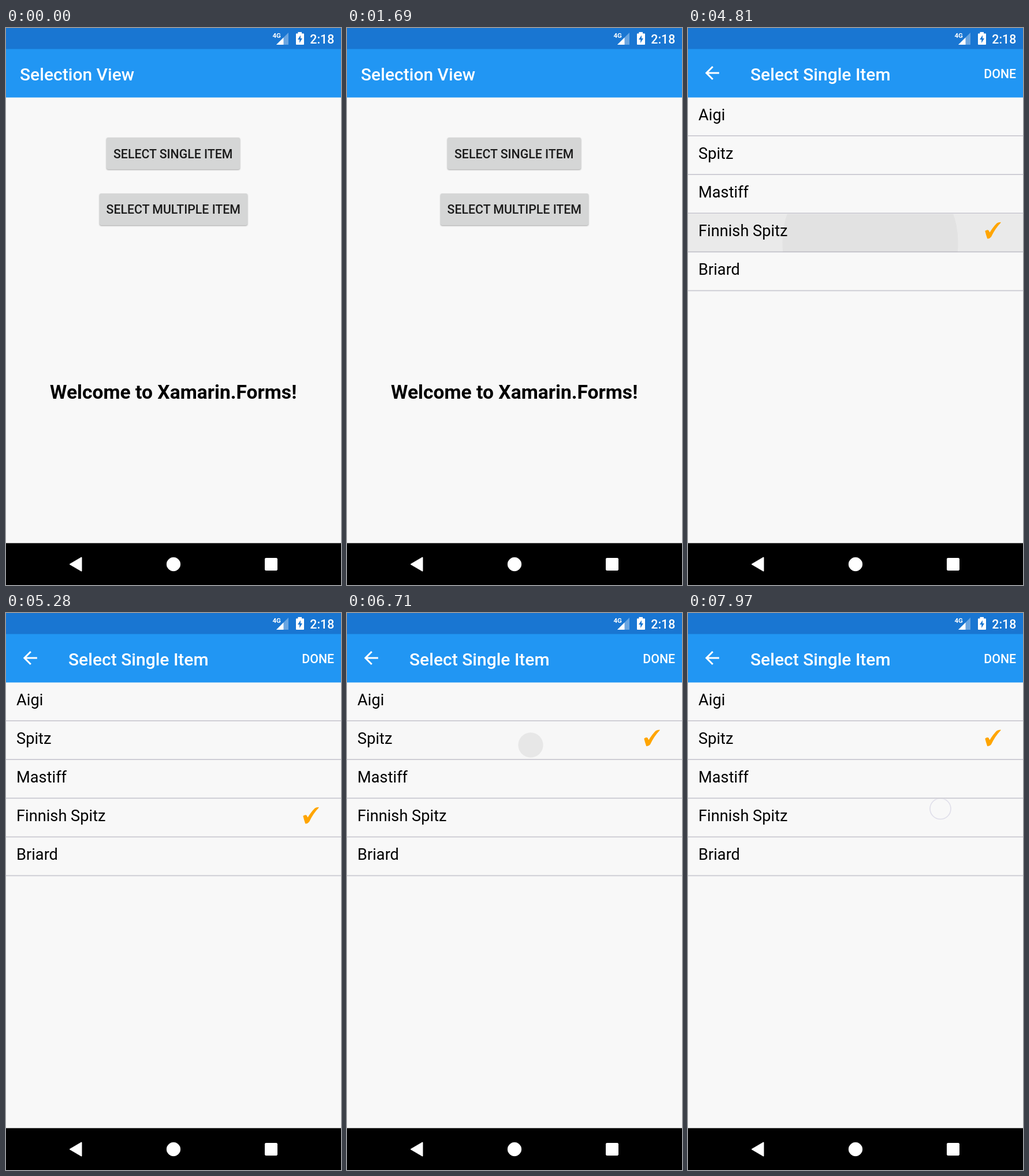
An HTML page for the animation above (8 s loop, 580 px wide and 966 px high).

```html
<!DOCTYPE html>
<html lang="en">
<head>
<meta charset="utf-8">
<title>Selection View</title>
<style>
  html, body { margin: 0; width: 100%; height: 100%; overflow: hidden; background: #f8f8f8; }
  svg { display: block; width: 580px; height: 966px; font-family: Roboto, sans-serif; }
  .title { font-size: 30px; font-weight: 500; fill: #fff; }
  .label { font-size: 21.3px; font-weight: 500; }
  .item { font-size: 27.2px; }
  .welcome { font-size: 33.6px; font-weight: 700; }
  .button { fill: #d5d6d6; filter: drop-shadow(0 1.2px 1.3px rgba(0, 0, 0, .35)); }
</style>
</head>
<body>
<svg viewBox="0 0 580 966">
  <defs>
    <clipPath id="contentClip"><rect y="120" width="580" height="774"/></clipPath>
    <clipPath id="buttonClip"><rect x="174" y="190" width="231" height="55" rx="3"/></clipPath>
    <clipPath id="rowClip"><rect id="rowClipRect" width="580" height="66"/></clipPath>
  </defs>
  <rect width="580" height="966" fill="#f8f8f8"/>

  <g clip-path="url(#contentClip)">
    <g id="home" text-anchor="middle">
      <rect class="button" x="174" y="190" width="231" height="55" rx="3"/>
      <circle id="buttonRipple" cx="290" cy="218" clip-path="url(#buttonClip)"/>
      <text class="label" x="289.2" y="225.6" fill="#1b1b1b">SELECT SINGLE ITEM</text>
      <rect class="button" x="162" y="287" width="256" height="55" rx="3"/>
      <text class="label" x="289.8" y="322.3" fill="#1b1b1b">SELECT MULTIPLE ITEM</text>
      <text class="welcome" x="289.7" y="642.5">Welcome to Xamarin.Forms!</text>
    </g>
    <g id="list">
      <g id="rows"></g>
      <g clip-path="url(#rowClip)">
        <rect id="rowTint" y="121" width="580" height="345"/>
        <circle id="rowRipple" stroke="#d9d7e6" stroke-width="1.6"/>
      </g>
      <g id="labels"></g>
      <path id="check" fill="#ffa500" stroke="#ffa500" stroke-width="1.2" stroke-linejoin="round" d="M515 218Q518 215.5 520 217L522.3 221.5Q529 210.5 535 204.8Q537.5 203 541 203Q531 213.5 524.5 227.5Q522 230.5 518.7 230.5Q516.5 224 515 218Z"/>
    </g>
  </g>

  <rect width="580" height="37" fill="#1976d2"/>
  <rect y="36.5" width="580" height="84" fill="#2196f3"/>
  <g fill="#fff">
    <text x="461.5" y="17" font-size="11.5" font-weight="700">4G</text>
    <path d="M489 8V29H468Z" opacity=".35"/>
    <path d="M480.5 16.5V29H468Z"/>
    <path d="M505.5 7H512V9.5H515Q516 9.5 516 10.5V28Q516 29 515 29H503Q502 29 502 28V10.5Q502 9.5 503 9.5H505.5Z"/>
    <path d="M510 12.5L505 20H508.2V26L513 18H510Z" fill="#1976d2"/>
    <text class="label" x="526.3" y="26.6">2:18</text>
  </g>
  <text id="homeTitle" class="title" x="24" y="90.5">Selection View</text>
  <g id="listBar" fill="#fff">
    <path transform="translate(23.7 59.9) scale(1.51)" d="M20 11H7.83l5.59-5.59L12 4l-8 8 8 8 1.41-1.41L7.83 13H20z"/>
    <text class="title" x="108" y="90.5">Select Single Item</text>
    <text class="label" x="512.3" y="86.8">DONE</text>
  </g>

  <rect y="893.4" width="580" height="73" fill="#000"/>
  <g fill="#fff" stroke="#fff" stroke-linejoin="round">
    <path d="M111 930L130.5 918.5V941.5Z" stroke-width="2"/>
    <circle cx="290" cy="930" r="11.7"/>
    <rect x="448.5" y="919.5" width="21" height="21" rx="1.5"/>
  </g>
</svg>
<script>
const LOOP = 8000, ROW = 67.15, TOP = 121;
const PUSH_START = 3080, PUSH_TIME = 220;
const RIPPLE_SPEED = 0.46, PRESS_RADIUS = 18, PRESS_TIME = 170;

const taps = [
  { press: 4480, release: 4480, end: 5280, row: 3, x: 315.5, y: 372 },
  { press: 5570, release: 5570, end: 6330, row: 2, x: 315, y: 303 },
  { press: 6420, release: 6703, end: 7300, row: 1, x: 318, y: 229 },
  { press: 7800, release: 8100, end: 8900, row: 3, x: 437, y: 339.5 }
];

const $ = id => document.getElementById(id);
const clamp = v => Math.max(0, Math.min(1, v));
const set = (id, attributes) => {
  for (const name in attributes) $(id).setAttribute(name, attributes[name]);
};

['Aigi', 'Spitz', 'Mastiff', 'Finnish Spitz', 'Briard'].forEach((name, i) => {
  const y = i * ROW;
  $('rows').innerHTML += `<rect y="${186 + y}" width="580" height="1.8" fill="#cbcad2"/>`;
  $('labels').innerHTML += `<text class="item" x="18.1" y="${159.6 + y}">${name}</text>`;
});

function scaleAboutCentre(s) {
  return `translate(290 507) scale(${s}) translate(-290 -507)`;
}

function drawPush(t) {
  const p = clamp((t - PUSH_START) / PUSH_TIME);
  const fade = 1 - (1 - p) ** 3, zoom = 1 - (1 - p) ** 5;
  const pushed = t >= PUSH_START;
  set('home', { opacity: 1 - fade, transform: scaleAboutCentre(1 - 0.025 * zoom) });
  set('list', { opacity: fade, transform: scaleAboutCentre(1.125 - 0.125 * zoom) });
  set('homeTitle', { opacity: pushed ? 0 : 1 });
  set('listBar', { opacity: pushed ? 1 : 0 });
  const pressed = Math.max(0, t - 2860);
  set('buttonRipple', { r: pressed * RIPPLE_SPEED, opacity: 0.12 * clamp(pressed / 80) });
}

function drawTaps(t) {
  const tap = taps.find(a => t >= a.press && t < a.end);
  if (tap) {
    const since = Math.max(0, t - tap.release);
    const held = Math.min(t, tap.release) - tap.press;
    const fade = clamp((tap.end - t) / 500);
    const tint = clamp(since / 120);
    set('rowClipRect', { y: TOP + tap.row * ROW });
    set('rowTint', { opacity: 0.06 * tint * fade });
    set('rowRipple', {
      cx: tap.x, cy: tap.y,
      r: PRESS_RADIUS * clamp(held / PRESS_TIME) + RIPPLE_SPEED * since,
      'fill-opacity': since ? (0.065 - 0.03 * tint) * fade : 0,
      'stroke-opacity': since ? 0 : 0.8
    });
  } else {
    set('rowTint', { opacity: 0 });
    set('rowRipple', { r: 0, 'stroke-opacity': 0 });
  }
  const selected = taps.filter(a => t >= a.release + 5).pop();
  set('check', { transform: `translate(0 ${((selected ? selected.row : 1) - 1) * ROW})` });
}

function frame(now) {
  const t = now % LOOP;
  drawPush(t);
  drawTaps(t);
  requestAnimationFrame(frame);
}
requestAnimationFrame(frame);
</script>
</body>
</html>
```
